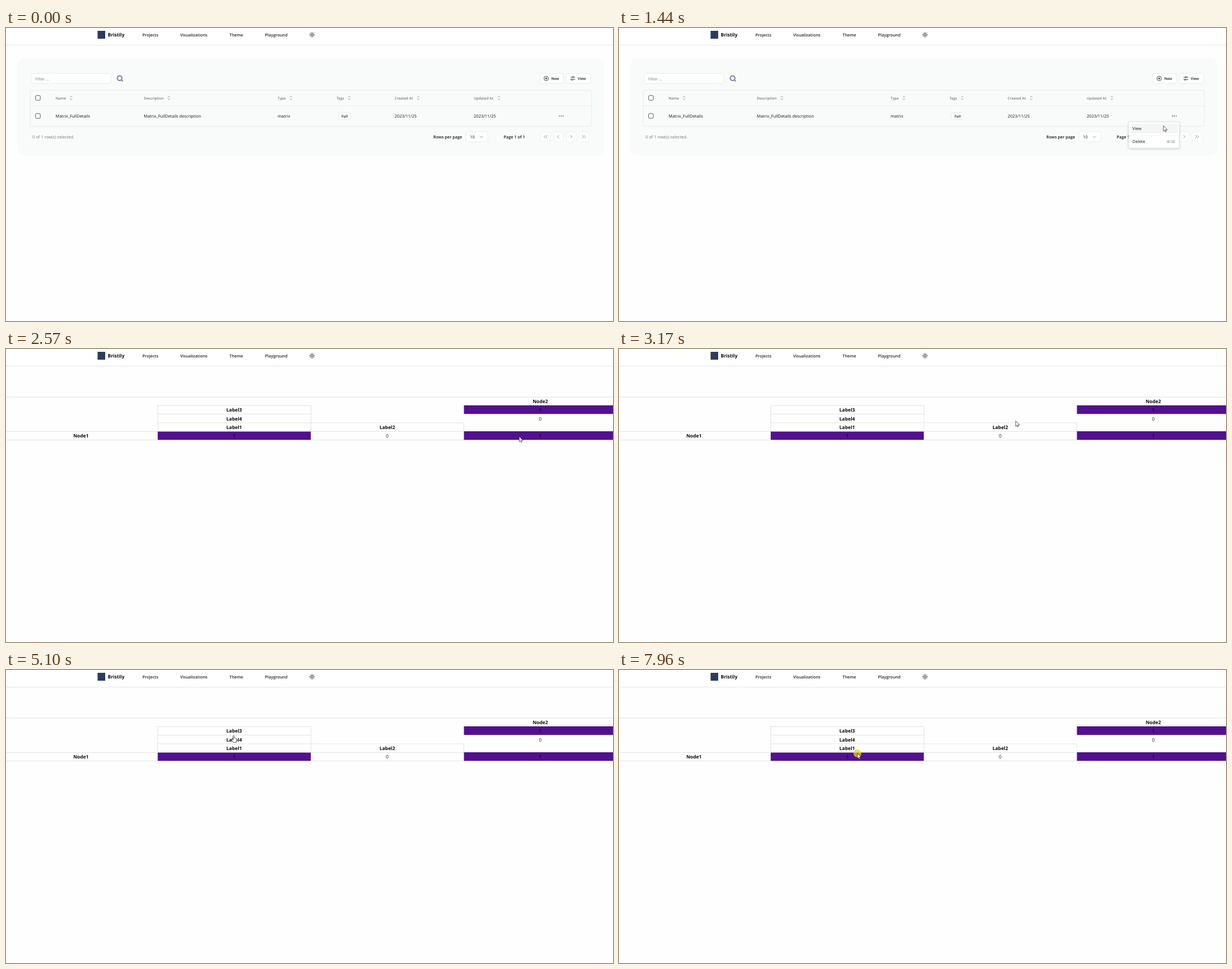
Recreate the animation shown at these times as an HTML page. Size 1077x520 px, loop 8 s.

```html
<!DOCTYPE html>
<html lang="en">
<head>
<meta charset="utf-8">
<title>Matrix view</title>
<style>
html, body { margin: 0; width: 100%; height: 100%; overflow: hidden; background: #fefefe; }
svg { display: block; width: 1077px; height: 520px; }
text { font-family: "Open Sans", "Noto Sans", sans-serif; text-rendering: geometricPrecision; white-space: pre; }
#menu > rect:first-child { filter: drop-shadow(0 1.5px 2px #0003); }
</style>
</head>
<body>
<svg id="stage" viewBox="0 0 1077 520"></svg>
<script>
const INK = '#111318', GREY = '#737780', EDGE = '#e3e6e8', PURPLE = '#52118f';

// y is the vertical middle of the text
const text = (x, y, s, size = 7.4, weight = 400, fill = INK, anchor = 'start') =>
  `<text x="${x}" y="${y + size * .36}" font-size="${size}" font-weight="${weight}" fill="${fill}" text-anchor="${anchor}">${s}</text>`;
const rect = (x, y, w, h, fill = '#fff', stroke = 'none', r = 0, more = '') =>
  `<rect x="${x}" y="${y}" width="${w}" height="${h}" rx="${r}" fill="${fill}" stroke="${stroke}" stroke-width=".8" ${more}/>`;
const path = (d, stroke = INK, width = .8, fill = 'none', more = '') =>
  `<path d="${d}" stroke="${stroke}" stroke-width="${width}" fill="${fill}" stroke-linecap="round" stroke-linejoin="round" ${more}/>`;
const circle = (x, y, r, fill, stroke = 'none', width = .9) =>
  `<circle cx="${x}" cy="${y}" r="${r}" fill="${fill}" stroke="${stroke}" stroke-width="${width}"/>`;
const group = (id, body) => `<g id="${id}">${body}</g>`;

function header() {
  const nav = [[242, 'Projects'], [309, 'Visualizations'], [396.5, 'Theme'], [459.5, 'Playground']];
  let rays = '';
  for (let i = 0; i < 8; i++) {
    const c = Math.cos(i * Math.PI / 4), s = Math.sin(i * Math.PI / 4);
    rays += `M${543 + 3.5 * c} ${12 + 3.5 * s}L${543 + 4.5 * c} ${12 + 4.5 * s}`;
  }
  return rect(0, 0, 1077, 30) + path('M0 30.3H1077', '#e2e4e7', .9)
    + rect(162.5, 5, 13.5, 14, '#2c3d5c')
    + text(180.5, 12.2, 'Bristily', 8.4, 700, '#08090c')
    + nav.map(([x, s]) => text(x, 12.2, s, 7.3, 600, '#20232a')).join('')
    + circle(543, 12, 2, 'none', INK, 1) + path(rays, INK, 1);
}

function list() {
  const heads = [[88, 'Name', 115.5], [244.5, 'Description', 289], [482, 'Type', 505.5],
    [586.5, 'Tags', 609], [689.5, 'Created At', 731.5], [830, 'Updated At', 874.5]];
  const cells = [[88, 'Matrix_FullDetails'], [244.5, 'Matrix_FullDetails description'],
    [482, 'matrix'], [689.5, '2023/11/25'], [830, '2023/11/25']];
  const left = x => `M${x + 1.2} 190.5l-2.5 2.5l2.5 2.5`;
  const right = x => `M${x - 1.2} 190.5l2.5 2.5l-2.5 2.5`;
  const pages = [[957.5, left(955.8) + left(959.2)], [979.7, left(979.7)],
    [1003, right(1003)], [1025.5, right(1023.8) + right(1027.2)]];
  const box = y => rect(52.5, y - 4.2, 8.4, 8.4, 'none', '#30343b', 1.8);

  return rect(20, 53.5, 1041.5, 173.5, '#f9fbfb', 'none', 13)
    + rect(44.5, 80.5, 141.5, 18, '#fff', EDGE, 3) + text(52, 90, 'Filter ...', 7.2, 400, GREY)
    + path('M204.5 92l2.2 2.2', '#77738f', 1.8) + circle(201.6, 89, 4.2, '#f2f1f8', '#8c88a8', 2.2)
    + rect(947, 80.5, 42, 18, '#fff', EDGE, 3) + circle(958.5, 89.5, 4, 'none', INK, .8)
    + path('M956.5 89.5h4M958.5 87.5v4') + text(967.5, 89.8, 'New', 6.35, 600)
    + rect(994, 80.5, 43, 18, '#fff', EDGE, 3)
    + path('M1002 87.3h3m2.5 0h1.7M1002 91.6h1.2m2.6 0h3.4') + circle(1006.2, 87.3, 1.2, 'none', INK, .8)
    + circle(1004.5, 91.6, 1.2, 'none', INK, .8) + text(1014.5, 89.8, 'View', 6.35, 600)
    + rect(43, 138, 996, 36.5, '#f8f8f8', 'none', 0, 'id="hover"')
    + rect(976, 147, 18.5, 18, '#f2f3f4', 'none', 3, 'id="dots"')
    + rect(42.8, 110.3, 996, 64.4, 'none', EDGE, 3) + path('M43 138H1039', EDGE)
    + box(124) + box(156)
    + heads.map(([x, s, a]) => text(x, 124.5, s, 6.35, 600, GREY)
      + path(`M${a - 1.6} 122.8l1.6-1.6l1.6 1.6m-3.2 2.8l1.6 1.6l1.6-1.6`, GREY)).join('')
    + cells.map(([x, s]) => text(x, 156.4, s)).join('')
    + rect(589.5, 150.3, 22.5, 11.8, '#fcfdfd', EDGE, 3) + text(600.7, 156.4, 'Full', 6.35, 600, INK, 'middle')
    + [982, 985.2, 988.4].map(x => circle(x, 156.2, .8, INK)).join('')
    + text(47, 193.2, '0 of 1 row(s) selected.', 7.4, 400, GREY)
    + text(758.3, 193.2, 'Rows per page', 7.25, 600)
    + rect(816, 184, 39, 18, '#fff', EDGE, 3) + text(823, 193.2, '10')
    + path('M841.3 192l2.5 2.5l2.5-2.5', '#777')
    + text(883, 193.2, 'Page 1 of 1', 7.25, 600)
    + pages.map(([x, d]) => rect(x - 8.8, 184.2, 17.6, 17.6, '#fcfdfd', '#edeff0', 3) + path(d, '#8a8d92', .9)).join('');
}

const menu = () => rect(904.3, 167, 89.7, 46, '#fff', EDGE, 3)
  + rect(907, 170, 84.5, 17, '#f4f5f6', 'none', 2, 'id="pick"')
  + path('M904.5 190.2H994', '#eceef0')
  + text(911, 178.5, 'View') + text(911, 201.8, 'Delete')
  + text(986.5, 201.8, '⌘⌫', 6.2, 400, '#8a8d94', 'end');

function matrix() {
  const bold = (x, y, s) => text(x, y, s, 8.4, 700, '#08090c', 'middle');
  const value = (x, y, s, c = '#222') => text(x, y, s, 8.4, 400, c, 'middle');
  const one = (x, y) => text(x, y, '1', 8.4, 600, '#15042a', 'middle');
  return path('M0 85.3H1077M0 146.4H269M541 146.4H812M0 161.5H1077M269.2 100.4H541V146.4M269.2 100.4V146.4'
      + 'M269.2 115.6H541M269.2 131H812.4V146.4', '#dcdcde', .8)
    + rect(812.5, 100, 264.5, 15.3, PURPLE) + rect(812.5, 146, 264.5, 15.2, PURPLE)
    + rect(269.2, 146.5, 271.6, 14.7, PURPLE)
    + bold(948, 93.2, 'Node2') + bold(133, 154.4, 'Node1')
    + bold(404.8, 108.4, 'Label3') + bold(404.8, 123.8, 'Label4')
    + bold(404.8, 139.1, 'Label1') + bold(676.5, 139.1, 'Label2')
    + one(948, 108.4) + value(948, 123.8, '0') + one(404.8, 154.4)
    + value(676.5, 154.4, '0') + one(948, 154.2);
}

const arrow = path('M0 0V9.2L2.1 7.3L3.5 10.4L4.9 9.8L3.5 6.8H6.4Z', '#26262b', .75, '#fff', 'id="arrow"');
const hand = path('M-1 1Q0-.5 1 1V5Q2 4 2.8 5.1Q3.8 4.4 4.4 5.6Q5.6 5.1 5.8 6.6V9.3Q5.6 11 4.6 12.5H-.6'
  + 'Q-1.8 10.4-3.8 7.8Q-4 6.2-2.5 6.7L-1 8Z', '#26262b', .75, '#fff', 'id="hand"');

stage.innerHTML = rect(0, 0, 1077, 520, '#fefefe') + header() + group('listView', list()) + group('matrixView', matrix())
  + group('menu', menu()) + group('cursor',
    '<circle id="press" r="7" fill="#f2d21c" opacity=".75"/>' + arrow + hand);

// time, x, y of the pointer tip
const moves = [
  [70, 1066, 453], [260, 1050, 385], [440, 1012, 240], [560, 992, 178], [680, 985.5, 160],
  [880, 985.5, 160], [1230, 969, 173], [1370, 967, 173.5], [1440, 966, 174],
  [2370, 966, 174], [2560, 915, 156], [2700, 860, 149], [2900, 780, 139], [3170, 704, 128],
  [3240, 697, 128], [3550, 560, 132], [3850, 430, 141], [4010, 392, 144],
  [4150, 359, 147], [4250, 347, 147], [4450, 352, 136], [4650, 376, 120], [4830, 394, 112],
  [4970, 394, 112], [5170, 409, 118], [6550, 410, 117.5], [6690, 416.5, 103.5],
  [7380, 416.5, 103.5], [7560, 419, 122], [7760, 423, 148]];
const presses = [[820, 880], [1970, 2100], [5630, 5760], [7150, 7220], [7960, 8000]];

function pointer(t) {
  const i = moves.findIndex(m => m[0] > t);
  if (i < 1) return moves[i ? moves.length - 1 : 0].slice(1);
  const [t0, x0, y0] = moves[i - 1], [t1, x1, y1] = moves[i];
  const k = (t - t0) / (t1 - t0);
  return [x0 + (x1 - x0) * k, y0 + (y1 - y0) * k];
}

const el = id => document.getElementById(id);
const show = (id, on) => el(id).style.display = on ? '' : 'none';
const within = (t, a, b) => t >= a && t < b;

function draw(now) {
  const t = now % 8000, [x, y] = pointer(t);
  show('listView', t < 2170);
  el('listView').setAttribute('opacity', Math.min(1, Math.max(0, (2170 - t) / 140)));
  show('hover', within(t, 570, 1230));
  show('dots', within(t, 630, 1230));
  show('menu', within(t, 850, 2040));
  show('pick', within(t, 1370, 2040));
  show('matrixView', t >= 2430);
  show('cursor', t >= 70);
  el('cursor').setAttribute('transform', `translate(${x} ${y})`);
  el('cursor').setAttribute('opacity', within(t, 2100, 2430) ? .65 : 1);
  const pointing = within(t, 4760, 7600);
  show('hand', pointing);
  show('arrow', !pointing);
  show('press', presses.some(([a, b]) => within(t, a, b)));
  requestAnimationFrame(draw);
}
draw(0);
</script>
</body>
</html>
```
